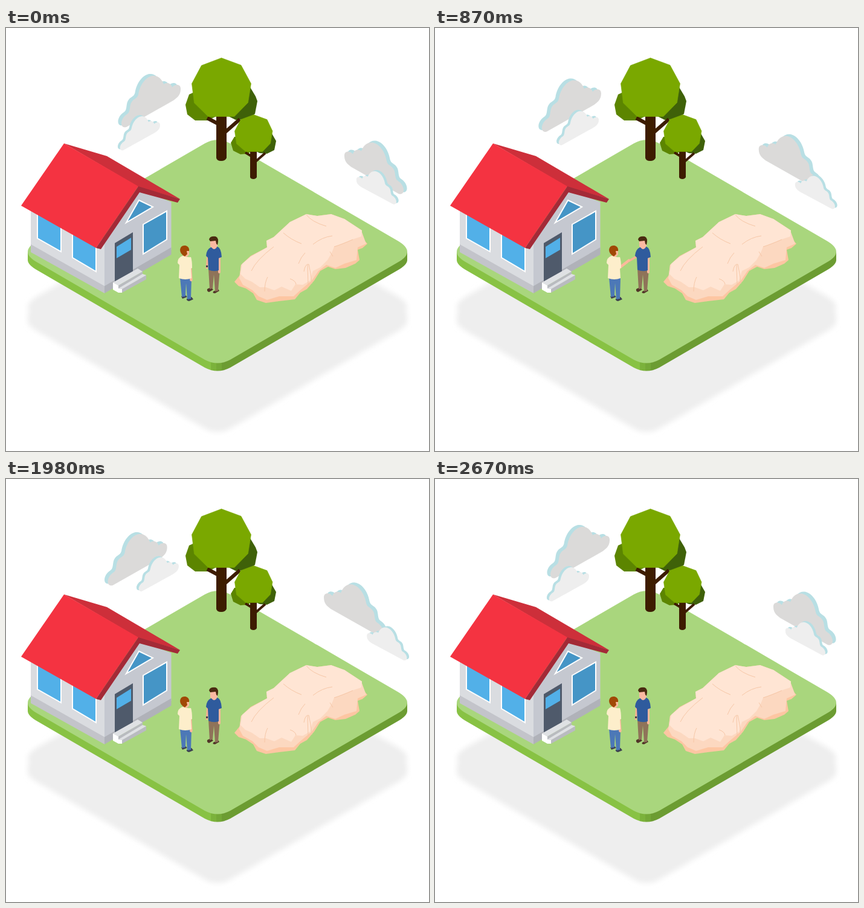
Animation, 700 px wide and 700 px high, one loop 2700 ms. Source, as an HTML page:

```html
<!DOCTYPE html>
<html lang="en">
<head>
<meta charset="utf-8">
<title>House plot</title>
<style>
  html, body { margin: 0; width: 100%; height: 100%; overflow: hidden; background: #fff; }
  svg { display: block; width: 100vw; height: 100vh; }
</style>
</head>
<body>
<svg viewBox="0 0 700 700">
  <defs>
    <path id="slab" d="M329 191Q350 179 371 191L648 352Q680 370.500 648 388L371 549Q350 560 329 549L52 388Q20 370.500 52 352Z"/>
    <path id="side" d="M36 370H664V384Q664 392 648 401L371 562Q350 573 329 562L52 401Q36 392 36 384Z"/>
    <path id="puff" d="M199 164C188 167 188 150 201 142C206 139 204 130 207 124C211 116 217 118 219 110C222 92 233 80 243 79C252 78 258 85 261 93C266 89 273 91 275 98C280 92 290 92 289 102C289 111 282 117 275 121Z"/>
    <g id="cloud"><use href="#puff" x="-5.500" y="-3" fill="#b8dfe4"/><use href="#puff"/></g>
    <linearGradient id="rim" gradientUnits="userSpaceOnUse" x1="36" x2="664" y1="0" y2="0">
      <stop offset=".482" stop-color="#88c244"/><stop offset=".482" stop-color="#7bb23b"/>
      <stop offset=".497" stop-color="#7bb23b"/><stop offset=".497" stop-color="#74a837"/>
      <stop offset=".511" stop-color="#74a837"/><stop offset=".511" stop-color="#6c9c32"/>
    </linearGradient>
    <filter id="soft" x="-5%" y="-5%" width="110%" height="110%"><feGaussianBlur stdDeviation="4"/></filter>
  </defs>

  <!-- ground -->
  <g fill="#eee" filter="url(#soft)">
    <use href="#slab" y="92"/>
    <use href="#side" y="101"/>
  </g>
  <use href="#side" fill="url(#rim)"/>
  <use href="#slab" fill="#a9d67d"/>

  <!-- trees -->
  <g id="bigTree">
    <path fill="#5c8500" d="M303 110L318 103L350 115V145L334 153H313L300 143L297 127Z"/>
    <path fill="#3f6109" d="M404 98L413 113L416 121L412 142L399 151L380 152L368 146L390 100Z"/>
    <path d="M363 172L387 151M350 158L333 149" stroke="#3d1c00" stroke-width="6"/>
    <path fill="#3d1c00" d="M348 140H365V215Q363 220 356 220Q349 220 348 215Z"/>
    <path fill="#7aa800" stroke="#7aa800" stroke-width=".6" d="M356.500 49.500L389 61.500L405.500 92L400.500 123.500L378 146.500H334.500L311.500 124L307.500 92L323.500 62Z"/>
  </g>
  <g id="smallTree">
    <path fill="#5c8500" d="M378 180L372 190L376 203L388 209L400 208L408 203L395 180Z"/>
    <path fill="#3f6109" d="M439 173L447 187L444 202L432 208L420 207L411 203L425 178Z"/>
    <path d="M413 221L429 207M406 212L396 206" stroke="#3d1c00" stroke-width="4"/>
    <path fill="#3d1c00" d="M404 200H415V247Q413 250 409.500 250Q405 250 404 247Z"/>
    <path fill="#7aa800" stroke="#7aa800" stroke-width=".6" d="M410 143.500L432 151.500L441 170.500L437.500 191L424.500 204.500H396.500L381.500 191.500L378.500 170.500L388.500 151.500Z"/>
  </g>

  <!-- house -->
  <g>
    <path fill="#dadce0" d="M41 295L163 350V430L41 361Z"/>
    <path fill="#c5c8d0" d="M163 350L221 268L273.500 288V367L163 430Z"/>
    <path fill="#c3c4ca" d="M41 358L163 427V439L41 371Z"/>
    <path fill="#b0b2b9" d="M163 427L273.500 363V375L163 439Z"/>
    <g stroke="#fff" stroke-width="2">
      <path fill="#52b0e8" d="M52 300L91 320V370L52 348ZM110 335L149 355V403L110 380Z"/>
      <path fill="#4595c6" d="M227 325L266 303V350L227 374ZM220 285L243 296L199 322Z"/>
    </g>
    <path fill="#4f5a6b" d="M180 356L210 338V403L180 421Z"/>
    <path fill="#52b0e8" d="M183 362L207 347V367L183 381Z"/>
    <path fill="#b9bbc0" d="M186 426L226 403V408L232 409V416L192 438L186 436Z"/>
    <path fill="#dfe1e4" d="M177 421L218 398L226 403L186 426ZM186 431L226 407L232 409L192 432Z"/>
    <path fill="#fff" d="M177 421L186 426V431L192 432V438L186 438L177 433Z"/>
    <path fill="#cd2f3a" d="M96 191L167 212L288 283L219 263Z"/>
    <path fill="#f43341" d="M25 294L96 191L219 262L149 364Z"/>
    <path fill="#a32a37" d="M149 364L219 262L288 283L284 289L221 272L157 366Z"/>
  </g>

  <!-- sand pile -->
  <g stroke-linejoin="round">
    <path fill="#fdc6a2" d="M378 420L387 409L389 392L405 377L432 363L431 352L443 346L459 331L470 321L497 308L515 311L538 308L560 316L589 335L588 346L598 357L590 364L582 367L585 384L578 390L562 397L545 399L533 395L520 402L510 418L498 432L487 438L478 449L452 452L430 455L415 450L409 439L397 431L385 427Z"/>
    <path fill="#fcd8c0" d="M386 414L389 392L432 363L470 321L560 316L589 338L596 357L582 363L580 384L560 390L545 397L530 392L517 402L506 418L488 433L476 444L452 444L432 450L418 444L408 434L392 425Z"/>
    <path fill="#ffe5d4" d="M388 407L391 390L405 378L432 363L431 352L443 346L470 321L497 308L515 311L538 308L560 316L589 335L588 345L573 350L558 356L543 362L539 372L532 384L520 396L508 402L503 418L491 425L479 424L472 435L456 428L444 434L430 429L420 429L407 420L396 415Z"/>
    <path fill="none" stroke="#f6c7a7" d="M406 402Q414 384 443 362M459 339Q471 350 489 357M497 309Q506 321 530 328M508 358Q523 346 540 344M484 390Q488 379 495 372M493 403Q495 390 501 391Q505 407 506 423M499 392L500 425M428 436Q428 421 433 412M543 362Q556 358 574 350M541 378L536 370M470 415Q479 418 480 424"/>
  </g>

  <!-- right man -->
  <g>
    <g stroke-linecap="round" stroke-width="3.500">
      <path id="armR" stroke="#f6b193"/>
      <path id="watch" stroke="#493743" stroke-width="3" stroke-linecap="butt"/>
    </g>
    <path fill="#513528" d="M333 432L339 429L343 433L336 437Q332 436 333 432ZM343 436L351 432L353 435L346 439Q341 439 343 436Z"/>
    <path fill="#8f7359" d="M335 398H354L351 435L346 436L344 408L342 431L337 432Z"/>
    <path d="M353 378V404" stroke="#fbb99c" stroke-width="4" stroke-linecap="round"/>
    <path fill="#2f5b9d" d="M339 363L350 362Q356 364 357 379L352 381V401Q343 404 335 400L334 380L331 377Q332 366 339 363Z"/>
    <path fill="#fbb9a2" d="M338 351H350V360L348 364Q344 368 341 364L338 361Z"/>
    <path fill="#4a2a10" d="M336 350Q337 344 347 345Q353 347 350 359L348 357L347 352L338 353Z"/>
  </g>

  <!-- left man -->
  <g>
    <path fill="#3d4050" d="M290 444L297 442L300 445L292 448ZM299 448L307 445L310 449L303 452Q298 451 299 448Z"/>
    <path fill="#4c78b7" d="M288 413H307L306 448L300 449L298 422L297 444L291 445Z"/>
    <path fill="#fbb99c" d="M293 368H303V375L300 378L298 382H293Z"/>
    <path id="armL" stroke="#fbb99c" stroke-width="4.500" stroke-linecap="round"/>
    <path fill="#fdeecb" d="M292 377Q300 380 306 379Q308 385 308 397L306 398L307 414Q297 418 286 414L287 392L284 389Q284 380 292 377Z"/>
    <path fill="#a14806" d="M288 367Q289 359 297 360Q304 362 303 369L299 369L300 374L296 378Q288 374 288 367Z"/>
  </g>

  <!-- clouds -->
  <g fill="#dbdad9">
    <g id="c0"><use href="#cloud"/></g>
    <g id="c2"><use href="#cloud" transform="translate(849 110.500) scale(-1 1)"/></g>
  </g>
  <g fill="#eee">
    <g id="c1"><use href="#cloud" transform="translate(59.800 94) scale(.675 .66)"/></g>
    <g id="c3"><use href="#cloud" transform="translate(774.900 186.500) scale(-.675 .64)"/></g>
  </g>
</svg>
<script>
  const LOOP = 2700, BACK = 2670;
  const el = id => document.getElementById(id);
  const ease = u => (1 - Math.cos(Math.PI * u)) / 2;

  // drift of each cloud and the time it turns around
  const drifts = [
    { dx: -27.5, dy: 14.7, turn: 1710 },
    { dx: 34.2, dy: -18.2, turn: 1810 },
    { dx: -44.5, dy: -19.8, turn: 1650 },
    { dx: 26.3, dy: 12.8, turn: 1530 }
  ];
  const clouds = drifts.map((d, i) => ({ ...d, node: el('c' + i) }));

  // 0 = hanging, 1 = low clasp, 2 = raised clasp
  function lift(t) {
    if (t < 540) return Math.max(0, (t - 60) / 240);
    if (t < 1080) return 2;
    return Math.max(0, 2 - (t - 1080) / 270);
  }

  function reach(x, y, angles, k) {
    const i = Math.min(1, Math.floor(k));
    const a = (angles[i] + (angles[i + 1] - angles[i]) * (k - i)) * Math.PI / 180;
    return r => (x + r * Math.cos(a)).toFixed(2) + ' ' + (y + r * Math.sin(a)).toFixed(2);
  }

  function draw(t) {
    for (const { dx, dy, turn, node } of clouds) {
      const u = t < turn ? t / turn : Math.max(0, (BACK - t) / (BACK - turn));
      const k = ease(u);
      node.setAttribute('transform', `translate(${dx * k} ${dy * k})`);
    }
    const k = Math.min(2, lift(t));
    const left = reach(305, 397, [86, -5, -38], k);
    const right = reach(334, 378, [95, 121, 150], k);
    el('armL').setAttribute('d', `M${left(0)}L${left(20)}`);
    el('armR').setAttribute('d', `M${right(0)}L${right(19)}`);
    el('watch').setAttribute('d', `M${right(15)}L${right(18)}`);
  }

  function tick() {
    draw(performance.now() % LOOP);
    requestAnimationFrame(tick);
  }
  tick();
</script>
</body>
</html>
```
